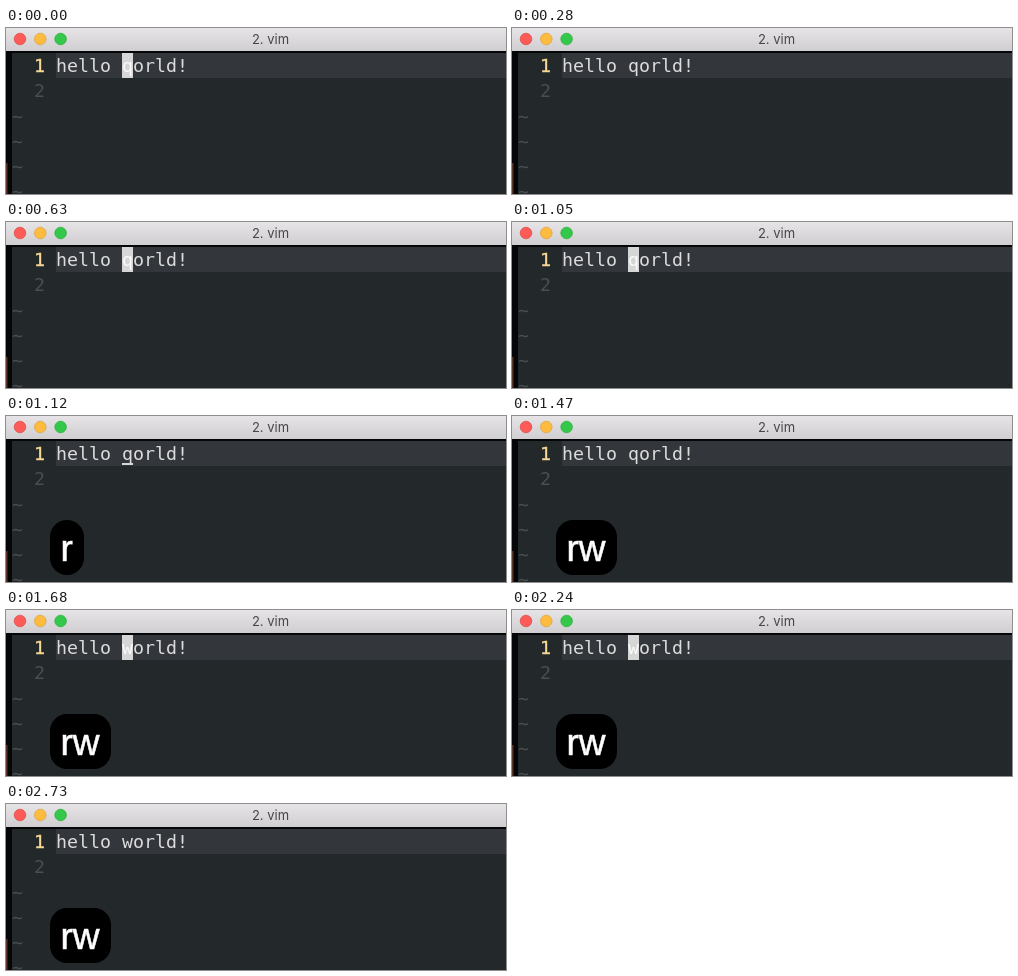
Recreate the animation shown at these times as an HTML page. Size 500 by 166 pixels, loop 2.8 s.

```html
<!DOCTYPE html>
<html lang="en">
<head>
<meta charset="utf-8">
<title>vim</title>
<style>
  html, body { margin: 0; width: 100%; height: 100%; overflow: hidden; background: #23282b; }
  svg { display: block; width: 500px; height: 166px; }
  .code { font: 18.3px "DejaVu Sans Mono", monospace; white-space: pre; }
  .title { font: 13px Inter, sans-serif; fill: #484648; }
  .keys { font: 37px "Liberation Sans", Arial, sans-serif; fill: #fff; stroke: #fff; stroke-width: .6; }
  .dim { fill: #4a4f52; }
</style>
</head>
<body>
<svg viewBox="0 0 500 166">
  <defs>
    <linearGradient id="bar" x2="0" y2="1">
      <stop offset="0" stop-color="#e6e4e6"/>
      <stop offset="1" stop-color="#d0ced0"/>
    </linearGradient>
  </defs>
  <rect width="500" height="166" fill="#050607"/>
  <rect width="500" height="23" fill="url(#bar)"/>
  <g stroke-width=".7">
    <circle cx="14" cy="11" r="5.8" fill="#fc5b57" stroke="#df4744"/>
    <circle cx="34.3" cy="11" r="5.8" fill="#fdbc40" stroke="#dea034"/>
    <circle cx="54.6" cy="11" r="5.8" fill="#34c84a" stroke="#27aa35"/>
  </g>
  <text class="title" x="264.5" y="15.7" text-anchor="middle">2. vim</text>

  <rect x="6" y="25" width="494" height="141" fill="#23282b"/>
  <rect x="50" y="25" width="450" height="25" fill="#33363b"/>
  <rect y="135" width="1.5" height="31" fill="#5a3428"/>

  <rect id="block" x="116" y="25" width="11" height="25" fill="#d6d6d6"/>
  <rect id="under" x="116" y="47" width="11" height="2" fill="#d6d6d6"/>
  <g class="code">
    <text x="28" y="44" fill="#f6d794" stroke="#f6d794" stroke-width=".4">1</text>
    <text class="dim" x="28" y="69">2</text>
    <g id="tildes" class="dim"></g>
    <text x="50" y="44" fill="#dcdcdc">hello</text>
    <text id="letter" x="116" y="44">q</text>
    <text x="127" y="44" fill="#dcdcdc">orld!</text>
  </g>

  <g id="bubble">
    <rect id="pill" x="44" y="104" height="55" rx="17" fill="#000"/>
    <text id="keys" class="keys" x="54.5" y="145"></text>
  </g>
</svg>
<script>
  const LOOP = 2800;
  const $ = id => document.getElementById(id);

  // [start ms, value]
  const cursor = [[0, "block"], [280, ""], [560, "block"], [840, ""], [1050, "block"],
    [1120, "under"], [1400, ""], [1680, "block"], [2030, ""], [2240, "block"], [2590, ""]];
  const typed = [[0, ""], [1120, "r"], [1470, "rw"]];
  const letter = [[0, "q"], [1540, "w"]];
  const pillWidth = { "": 0, r: 34, rw: 61 };

  const at = (steps, t) => steps.filter(s => s[0] <= t).pop()[1];
  const show = (id, on) => $(id).setAttribute("visibility", on ? "visible" : "hidden");

  for (let row = 2; row < 6; row++) {
    const el = document.createElementNS("http://www.w3.org/2000/svg", "text");
    el.setAttribute("x", 6);
    el.setAttribute("y", 45 + row * 25);
    el.textContent = "~";
    $("tildes").append(el);
  }

  function draw(t) {
    const shape = at(cursor, t), keys = at(typed, t);
    show("block", shape === "block");
    show("under", shape === "under");
    $("letter").textContent = at(letter, t);
    $("letter").setAttribute("fill", shape === "block" ? "#fafafa" : "#dcdcdc");
    show("bubble", keys);
    $("pill").setAttribute("width", pillWidth[keys]);
    $("keys").textContent = keys;
  }

  const start = performance.now();
  function tick() {
    draw((performance.now() - start) % LOOP);
    requestAnimationFrame(tick);
  }
  tick();
</script>
</body>
</html>
```
